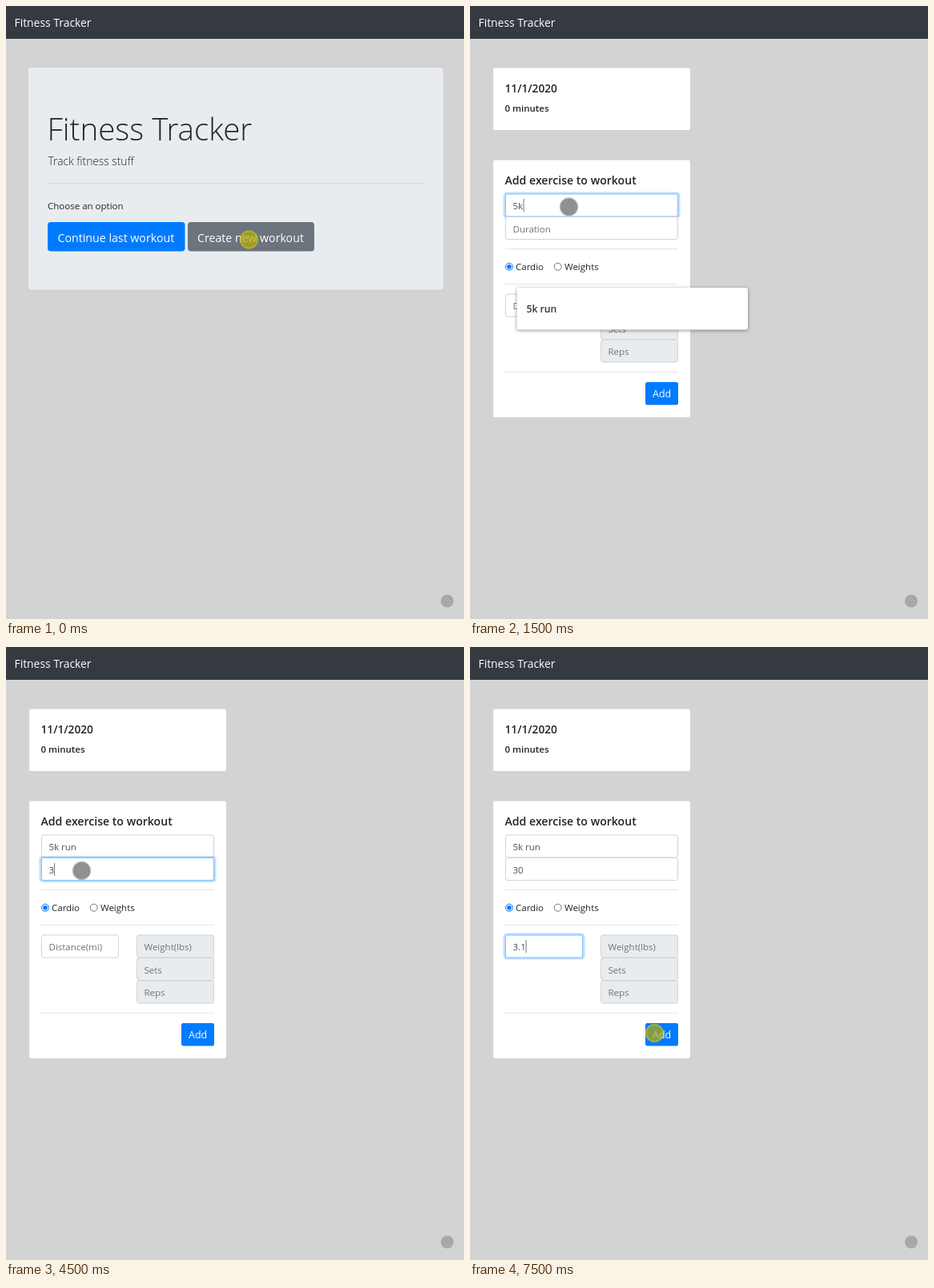
Write an HTML page that moves like this. It is 572 px wide and 766 px high and loops after 8000 ms.

```html
<!DOCTYPE html>
<html lang="en">
<head>
<meta charset="utf-8">
<title>Fitness Tracker</title>
<style>
  html, body { margin: 0; height: 100%; overflow: hidden; background: #d3d3d3; }
  svg { display: block; width: 100%; height: 100%; }
  text { font: 11.5px "Open Sans", "Noto Sans", sans-serif; fill: #212529; white-space: pre; }
  .light { font-weight: 300; }
  .semi { font-weight: 600; }
  .nav { font-size: 13.9px; fill: #fff; }
  .display { font-size: 38.5px; }
  .lead { font-size: 13.8px; }
  .btn { font-size: 14.2px; fill: #fff; }
  .btn-sm { font-size: 12.5px; fill: #fff; }
  .title { font-size: 14.1px; }
  .date { font-size: 13.7px; }
  .hint { font-size: 12.2px; fill: #333; }
  .card, .popup rect { fill: #fff; }
  .primary { fill: #007bff; }
  .line { fill: rgba(0, 0, 0, .1); }
  .field .box { fill: #fff; stroke: #ced4da; }
  .field text { fill: #6c757d; }
  .field.off .box { fill: #e9ecef; }
  .field.filled text { fill: #495057; }
  .field .ring { fill: rgba(0, 123, 255, .25); visibility: hidden; }
  .field.focus .ring { visibility: visible; }
  .field.focus .box { stroke: #80bdff; }
  .popup { filter: drop-shadow(0 1px 2px rgba(0, 0, 0, .42)); }
  #caret { fill: #777; }
  #cursor .core { fill: rgba(70, 70, 70, .6); }
  #cursor .rim { fill: none; stroke: rgba(140, 140, 140, .6); stroke-width: 2; }
  #cursor.press .core { fill: rgba(180, 170, 4, .72); }
  #cursor.press .rim { stroke: rgba(205, 195, 30, .65); }
</style>
</head>
<body>
<svg viewBox="0 0 572 766" preserveAspectRatio="none">
  <rect width="572" height="766" fill="#d3d3d3"/>
  <rect width="572" height="41" fill="#343a40"/>
  <text class="nav" x="10.5" y="26">Fitness Tracker</text>

  <g id="welcome">
    <rect x="28" y="77" width="518" height="277.5" rx="4" fill="#e9ecef"/>
    <text class="display light" x="51.5" y="168">Fitness Tracker</text>
    <text class="lead light" x="52.5" y="199">Track fitness stuff</text>
    <rect class="line" x="52" y="221.5" width="470" height="1"/>
    <text x="52" y="254">Choose an option</text>
    <rect class="primary" x="52" y="270" width="171.5" height="36.5" rx="4"/>
    <text class="btn" x="64.5" y="295">Continue last workout</text>
    <rect x="227" y="270" width="158" height="36.5" rx="4" fill="#6c757d"/>
    <text class="btn" x="239" y="295">Create new workout</text>
  </g>

  <g id="form">
    <rect class="card" x="29" y="77.5" width="246" height="77.5" rx="2.5"/>
    <text class="date semi" x="43.5" y="108">11/1/2020</text>
    <text class="semi" x="43.5" y="132">0 minutes</text>
    <rect class="card" x="29" y="192.5" width="246" height="321.5" rx="2.5"/>
    <text class="title semi" x="43.5" y="223">Add exercise to workout</text>
    <g id="fields"></g>
    <rect class="line" x="44" y="303" width="216" height="1"/>
    <rect class="line" x="44" y="347" width="216" height="1"/>
    <rect class="line" x="44" y="457" width="216" height="1"/>
    <circle cx="49" cy="325.7" r="4.5" fill="#fff" stroke="#0075ff"/>
    <circle cx="49" cy="325.7" r="2.8" fill="#0075ff"/>
    <text x="57" y="330">Cardio</text>
    <circle cx="109.7" cy="325.7" r="4.5" fill="#fff" stroke="#767676"/>
    <text x="118" y="330">Weights</text>
    <rect class="primary" x="219" y="470" width="41" height="28.5" rx="2.5"/>
    <text class="btn-sm" x="228" y="489">Add</text>
    <rect id="caret" width="1" height="16"/>
    <g id="popup" class="popup">
      <rect x="58.5" y="352" width="288.5" height="52.5" rx="3"/>
      <text class="hint semi" x="70.5" y="383">5k run</text>
    </g>
  </g>

  <circle cx="551" cy="743.5" r="8" fill="#a6a8ab"/>
  <g id="cursor">
    <circle class="core" r="10.5"/>
    <circle class="rim" r="10.7"/>
  </g>
</svg>
<script>
const $ = id => document.getElementById(id);
const LOOP = 8000;

// id, label, x, top, width, disabled
const fields = [
  ['name', 'Name', 44, 235, 216],
  ['duration', 'Duration', 44, 263.5, 216],
  ['distance', 'Distance(mi)', 44, 360, 97],
  ['weight', 'Weight(lbs)', 163, 360, 97, true],
  ['sets', 'Sets', 163, 388.5, 97, true],
  ['reps', 'Reps', 163, 417, 97, true]
].map(([id, label, x, y, w, off]) => {
  const el = document.createElementNS('http://www.w3.org/2000/svg', 'g');
  el.innerHTML = `
    <rect class="ring" x="${x - 2.5}" y="${y - 2.5}" width="${w + 5}" height="33" rx="4.5"/>
    <rect class="box" x="${x + .5}" y="${y}" width="${w - 1}" height="28" rx="2.5"/>
    <text x="${x + 9.5}" y="${Math.round(y + 19)}">${label}</text>`;
  $('fields').append(el);
  return { id, label, y, off, el, text: el.querySelector('text') };
});

// Each step changes only the listed parts of the state.
const steps = [
  [0, { page: 'welcome', focus: '', popup: 0, name: '', duration: '', distance: '', mouse: [303.5, 292, 1] }],
  [500, { page: 'form', mouse: [92.5, 246.5, 1] }],
  [1000, { focus: 'name', name: '5', caret: 60, popup: .6, mouse: [123.5, 251, 0] }],
  [1500, { name: '5k', caret: 66.5, popup: 1 }],
  [2000, { name: '5k ', caret: 70 }],
  [2500, { name: '5k r', caret: 74 }],
  [3000, { name: '5k ru', caret: 81 }],
  [3500, { name: '5k run', caret: 87.5, popup: 0 }],
  [4000, { mouse: [89, 285, 1] }],
  [4500, { focus: 'duration', duration: '3', caret: 60, mouse: [94.5, 279.5, 0] }],
  [5500, { duration: '30', caret: 66.5, mouse: [87, 375, 1] }],
  [6000, { focus: 'distance', distance: '3', caret: 60, mouse: [88.5, 364.5, 0] }],
  [6500, { distance: '3.', caret: 63 }],
  [7000, { distance: '3.1', caret: 69.5 }],
  [7500, { mouse: [230.5, 482.5, 1] }]
];

const show = (el, on) => el.setAttribute('display', on ? 'inline' : 'none');

function render(time) {
  const s = Object.assign({}, ...steps.filter(([at]) => at <= time).map(step => step[1]));
  show($('welcome'), s.page === 'welcome');
  show($('form'), s.page === 'form');

  for (const f of fields) {
    const focused = s.focus === f.id;
    f.text.textContent = s[f.id] || f.label;
    f.el.setAttribute('class', ['field', f.off && 'off', s[f.id] && 'filled', focused && 'focus'].filter(Boolean).join(' '));
    if (focused) {
      $('caret').setAttribute('x', s.caret);
      $('caret').setAttribute('y', Math.round(f.y + 6));
    }
  }
  show($('caret'), s.focus);

  // The suggestion list rises into place while it fades in.
  show($('popup'), s.popup);
  $('popup').setAttribute('opacity', s.popup);
  $('popup').setAttribute('transform', `translate(0 ${s.popup < 1 ? 7 : 0})`);

  const [x, y, press] = s.mouse;
  $('cursor').setAttribute('transform', `translate(${x} ${y})`);
  $('cursor').setAttribute('class', press ? 'press' : '');
}

const start = performance.now();
function tick() {
  render((performance.now() - start) % LOOP);
  requestAnimationFrame(tick);
}
tick();
</script>
</body>
</html>
```
